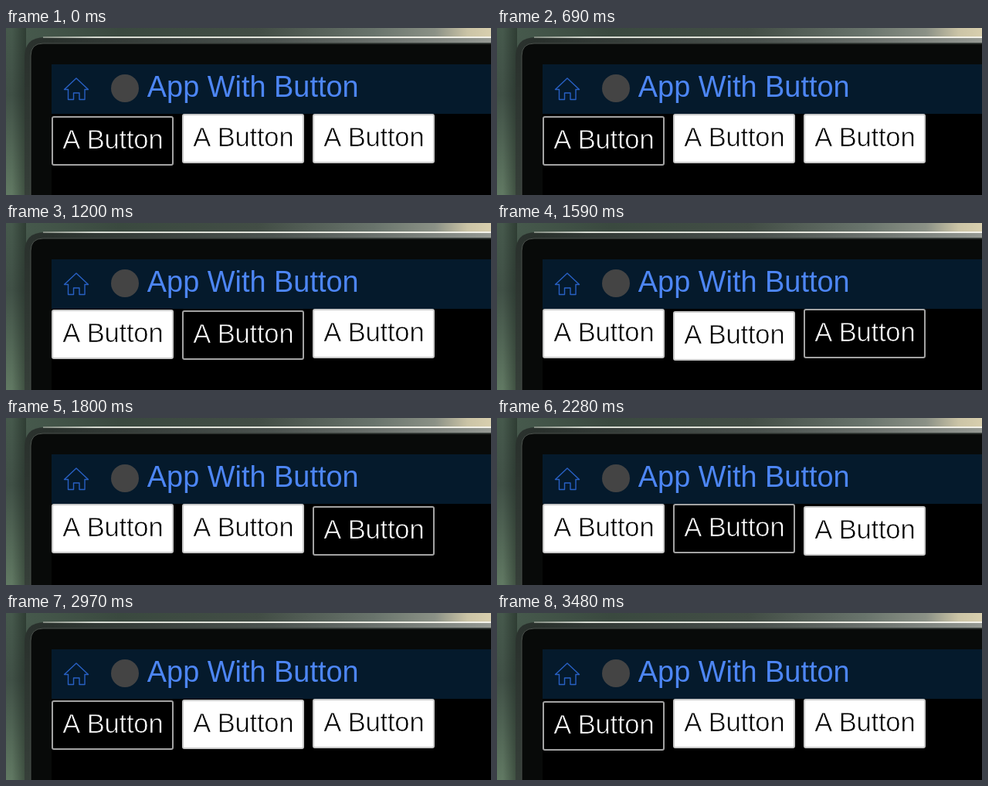
An HTML page for the animation above (3.57 s loop, 628x216 px).

```html
<!DOCTYPE html>
<html lang="en">
<head>
<meta charset="utf-8">
<title>Button focus</title>
<style>
  html, body { margin: 0; width: 100%; height: 100%; overflow: hidden; background: #000; }
  svg { display: block; width: 100%; height: 100%; }
  text { font-family: "Liberation Sans", Arial, sans-serif; font-kerning: none; }
  .label { font-size: 34.6px; letter-spacing: -.2px; word-spacing: -.8px; stroke-width: .75; }
</style>
</head>
<body>
<svg viewBox="0 0 628 216" preserveAspectRatio="none">
  <defs>
    <linearGradient id="wall" x2="0" y2="1">
      <stop offset="0" stop-color="#46594c"/>
      <stop offset=".4" stop-color="#405046"/>
      <stop offset="1" stop-color="#617963"/>
    </linearGradient>
    <linearGradient id="top">
      <stop offset="0" stop-color="#46594c"/>
      <stop offset=".2" stop-color="#3a493f"/>
      <stop offset=".5" stop-color="#424d45"/>
      <stop offset=".75" stop-color="#69746c"/>
      <stop offset=".88" stop-color="#8b9186"/>
      <stop offset=".95" stop-color="#cbc4a6"/>
      <stop offset="1" stop-color="#d8cfae"/>
    </linearGradient>
    <linearGradient id="shade" gradientUnits="userSpaceOnUse" x1="0" x2="26" y1="0" y2="0">
      <stop offset=".3" stop-color="#18211b" stop-opacity="0"/>
      <stop offset="1" stop-color="#18211b" stop-opacity=".5"/>
    </linearGradient>
    <linearGradient id="shine" gradientUnits="userSpaceOnUse" x1="46" x2="628" y1="0" y2="0">
      <stop offset="0" stop-color="#7d867c"/>
      <stop offset=".12" stop-color="#d5d9d0"/>
      <stop offset="1" stop-color="#f4f3ea"/>
    </linearGradient>
    <linearGradient id="rim" gradientUnits="userSpaceOnUse" x1="0" x2="0" y1="12" y2="216">
      <stop offset="0" stop-color="#2a312d"/>
      <stop offset=".3" stop-color="#2c342f"/>
      <stop offset="1" stop-color="#363f39"/>
    </linearGradient>
    <linearGradient id="glow" gradientUnits="userSpaceOnUse" x1="60" x2="628" y1="0" y2="0">
      <stop offset="0" stop-color="#7d8582" stop-opacity="0"/>
      <stop offset=".5" stop-color="#7d8582" stop-opacity=".4"/>
      <stop offset="1" stop-color="#969a94"/>
    </linearGradient>
  </defs>

  <rect width="628" height="216" fill="url(#wall)"/>
  <rect width="26" height="216" fill="url(#shade)"/>
  <rect x="26" width="602" height="13" fill="url(#top)"/>
  <path d="M24 216V38Q24 12 50 12H628V216Z" fill="url(#rim)"/>
  <path d="M60 13H628V19H60Z" fill="url(#glow)"/>
  <path d="M48 12H628" stroke="url(#shine)" stroke-width="2"/>
  <path d="M32 216V36Q32 20 48 20H628V216Z" fill="#080a09"/>
  <path d="M32 216V36Q32 20 48 20H628" fill="none" stroke="#4b514c"/>
  <path d="M59 47H628V216H59Z" fill="#000"/>
  <path d="M59 47H628V111H59Z" fill="#051a2c"/>

  <path d="M75.5 79.5L91 65L106.5 79.5H102V92.5H95V84H87.5V92.5H80.5V79.5Z"
        fill="none" stroke="#2860c4" stroke-width="1.4" stroke-linejoin="round"/>
  <circle cx="154" cy="78" r="18" fill="#444"/>
  <text x="182.8" y="89.4" font-size="37.9" fill="#4d86f5">App With Button</text>
  <g id="buttons"></g>
</svg>
<script>
const NS = "http://www.w3.org/2000/svg";
const LOOP = 3570, EASE_MS = 300, DROP = 3;
const moves = [[1050, 1], [1590, 2], [2280, 1], [2850, 0]];

function add(parent, tag, attrs) {
  const el = document.createElementNS(NS, tag);
  for (const key in attrs) el.setAttribute(key, attrs[key]);
  return parent.appendChild(el);
}

const buttons = [59, 228, 397].map(x => {
  const group = add(document.getElementById("buttons"), "g", {});
  const box = add(group, "rect", { x: x + 1, y: 112, width: 156, height: 62, rx: 2, "stroke-width": 2 });
  const label = add(group, "text", { x: x + 14.2, y: 152.6, class: "label" });
  label.textContent = "A Button";
  return { group, box, label };
});

// cubic-bezier(.25, .1, .25, 1)
function ease(p) {
  if (p <= 0) return 0;
  if (p >= 1) return 1;
  const curve = (a, b, s) => 3 * a * s * (1 - s) ** 2 + 3 * b * s * s * (1 - s) + s ** 3;
  let lo = 0, hi = 1;
  for (let i = 0; i < 20; i++) {
    const mid = (lo + hi) / 2;
    if (curve(.25, .25, mid) < p) lo = mid; else hi = mid;
  }
  return curve(.1, 1, lo);
}

function draw(time) {
  const t = time % LOOP;
  let from = 0, to = 0, start = -EASE_MS;
  for (const [at, next] of moves) {
    if (t >= at) { from = to; to = next; start = at; }
  }
  const k = ease((t - start) / EASE_MS);
  buttons.forEach(({ group, box, label }, i) => {
    const on = i === to;
    const sunk = on ? (from === to ? 1 : k) : i === from ? 1 - k : 0;
    const back = on ? "#000" : "#fff";
    // buttons settle on whole pixels
    group.setAttribute("transform", `translate(0 ${Math.round(sunk * DROP)})`);
    box.setAttribute("fill", back);
    box.setAttribute("stroke", on ? "#a3a3a3" : "#c9c9c9");
    label.setAttribute("fill", on ? "#fff" : "#000");
    label.setAttribute("stroke", back);
  });
}

const begin = performance.now();
function tick() {
  draw(performance.now() - begin);
  requestAnimationFrame(tick);
}
tick();
</script>
</body>
</html>
```
